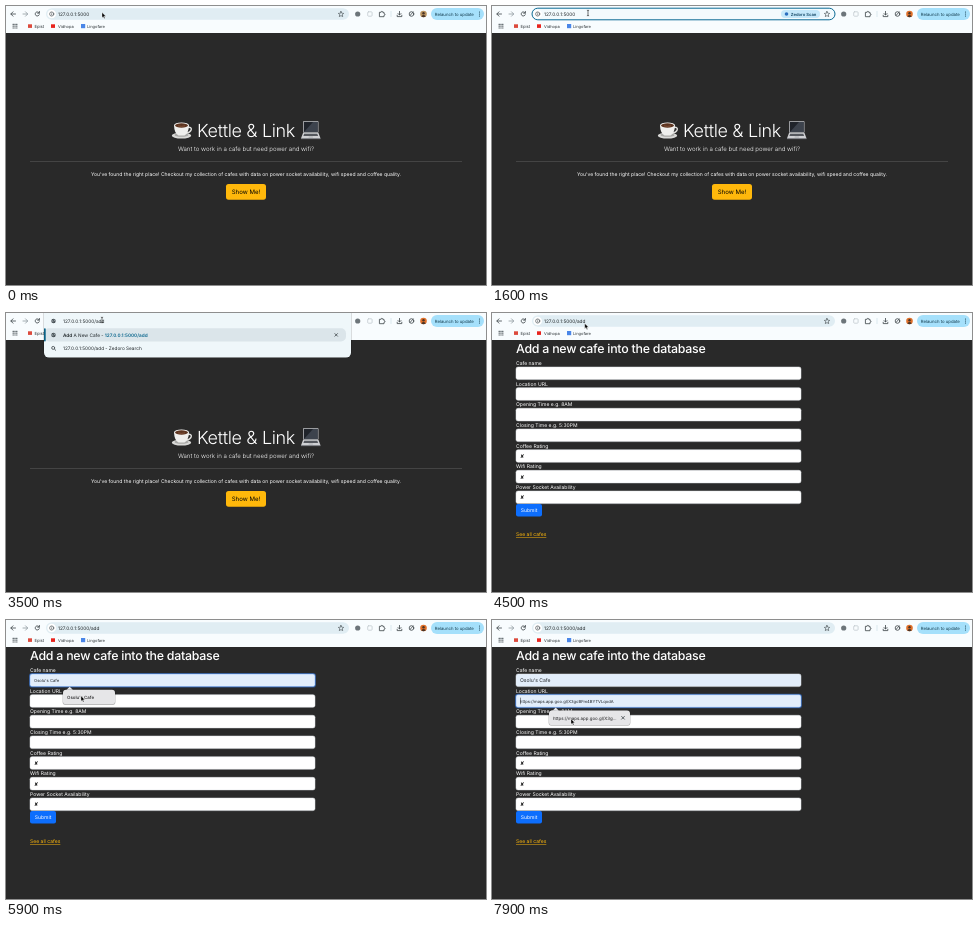
Animation, 480 px wide and 279 px high, one loop 8 s. Source, as an HTML page:

```html
<!DOCTYPE html>
<html lang="en">
<head>
<meta charset="utf-8">
<title>Cafe form</title>
<style>
  html, body { margin: 0; width: 100%; height: 100%; overflow: hidden; background: #292929; }
  svg { display: block; width: 100vw; height: 100vh; }
  text { font-family: Inter, "Open Sans", sans-serif; text-rendering: geometricPrecision; white-space: pre; }
  .icon { fill: none; stroke: #3c4347; stroke-width: .8; stroke-linecap: round; stroke-linejoin: round; }
  .pale { stroke: #c3cbd0; }
  .bold { font-weight: 600; }
  .link { fill: #08658c; }
  .mark { font-family: "DejaVu Sans", sans-serif; }
</style>
</head>
<body>
<svg id="stage" viewBox="0 0 480 279" preserveAspectRatio="none">
  <rect width="480" height="279" fill="#292929"/>

  <g id="home">
    <g id="cup">
      <ellipse cx="175.5" cy="129.6" rx="9.7" ry="3" fill="#d9d9d7"/>
      <ellipse cx="175.5" cy="129" rx="7" ry="1.7" fill="#a9a9a7"/>
      <path d="M181 121.5q5-1 4.2 2.2q-1 3-5.5 3.2" fill="none" stroke="#dededc" stroke-width="1.5"/>
      <path d="M168 119.5q.3 7.5 4.5 10h6q4.2-2.5 4.5-10z" fill="#efefed"/>
      <ellipse cx="175.5" cy="119.3" rx="7.5" ry="2.9" fill="#f6f6f4"/>
      <ellipse cx="175.5" cy="119.5" rx="6.5" ry="2.2" fill="#5c3420"/>
      <path d="M172 119.8q3.5 1.2 7 0" fill="none" stroke="#946044" stroke-width=".6"/>
    </g>
    <g id="laptop">
      <rect x="297" y="115" width="15.5" height="12" rx="1" fill="#b9babd"/>
      <rect x="297.8" y="115.8" width="13.9" height="10.4" fill="#20242b"/>
      <path d="M298 126l9-10h4.5v10z" fill="#3d434d"/>
      <path d="M297 127h15.5l2 5.2h-19.5z" fill="#cfd0d3"/>
      <path d="M298.2 127.8h13.1l.8 2.2h-14.7z" fill="#55585e"/>
      <path d="M302.8 130.5h4l.3 1.1h-4.6z" fill="#aeb0b4"/>
      <path d="M295 132.2h19.5v.9h-19.5z" fill="#8f9196"/>
    </g>
    <path d="M24 155.5H456" stroke="#585858" stroke-width=".6"/>
    <rect x="220" y="178" width="40" height="15.7" rx="2.6" fill="#ffb80b"/>
  </g>

  <g id="form"></g>

  <g id="bar">
    <rect width="480" height="27" fill="#f8fcfe"/>
    <path class="icon" d="M9.5 8H5M7 5.8L4.8 8 7 10.2"/>
    <path class="icon" style="stroke:#8d979d" d="M17 8h4.5M19.5 5.8L21.7 8l-2.2 2.2"/>
    <path class="icon" d="M33.2 7a2.1 2.1 0 1 0 .1 1.7M33.4 5.4v1.8h-1.8"/>
    <rect id="pill" x="40" y="2.2" width="303" height="11.6" rx="5.8"/>
    <g id="info">
      <circle cx="45.7" cy="8" r="4.3" fill="#fff"/>
      <circle class="icon" cx="45.7" cy="8" r="2.1" style="stroke-width:.6"/>
      <path class="icon" d="M45.7 7.9v1M45.7 6.9v.05" style="stroke-width:.6"/>
    </g>
    <g id="chip">
      <rect x="289" y="4" width="39" height="8" rx="4" fill="#c5e8fa"/>
      <circle cx="294.5" cy="8" r="1.8" fill="#2a6fc0"/>
    </g>
    <path class="icon" style="stroke-width:.6" d="M335 5.4l.8 1.8 1.9.2-1.4 1.3.4 1.9-1.7-1-1.7 1 .4-1.9-1.4-1.3 1.9-.2z"/>
    <circle cx="351.7" cy="8" r="2.6" fill="#6d757a"/>
    <rect x="361.7" y="5.8" width="4.4" height="4.4" rx=".8" class="icon pale"/>
    <path class="icon" d="M373.8 6.3h1.3q0-1 .8-1t.8 1h1.3v1.4q1 0 1 .8t-1 .8v1.4h-4.2z"/>
    <path d="M385 5v6" stroke="#c6dbe5" stroke-width=".6"/>
    <path class="icon" d="M393.5 5.4v3.5M392 7.5l1.5 1.5 1.5-1.5M391.2 9.2v1.4h4.6V9.2"/>
    <circle class="icon" cx="405.5" cy="8" r="2.3"/>
    <path class="icon" d="M404.2 9.3l3-3.4"/>
    <circle id="face" cx="417.5" cy="8" r="3.3"/>
    <path d="M415.3 10.4q2.2-2.6 4.4 0-2.2 1.6-4.4 0z" fill="#4a3426"/>
    <circle cx="417.5" cy="7.3" r="1.2" fill="#4a3426"/>
    <rect x="425" y="2" width="53" height="12" rx="6" fill="#a5e0fb"/>
    <g fill="#123a4c"><circle cx="473.5" cy="6" r=".55"/><circle cx="473.5" cy="8" r=".55"/><circle cx="473.5" cy="10" r=".55"/></g>
    <g id="grid"></g>
    <rect x="22" y="18.3" width="4" height="3.6" fill="#dc4a3d"/>
    <rect x="45" y="18.3" width="4" height="3.6" fill="#e8231d"/>
    <rect x="75" y="18" width="4.2" height="4.2" fill="#4a86e8"/>
  </g>

  <g id="drop"></g>
  <rect id="select" y="4.2" height="7.6" fill="#0b6286"/>
  <text id="url" y="9.7" font-size="4.75" fill="#1d2326"><tspan id="typed"></tspan><tspan id="rest" fill="#fff"></tspan></text>

  <g id="popup"></g>
  <path id="arrow" d="M0 0v5.2l1.2-1.1.9 2 .9-.4-.9-1.9h1.7z" fill="#000" stroke="#fff" stroke-width=".35"/>
  <path id="beam" d="M94.9 4.2q1.1 0 1.1.8v4q0 .8-1.1.8M97.1 4.2q-1.1 0-1.1.8M96 9q0 .8 1.1.8" fill="none" stroke="#111" stroke-width=".6"/>
</svg>
<script>
const LOOP = 8000, STEP = 100;
const HOST = "127.0.0.1:5000", CAFE = "Osolu's Cafe", MAP = "https://maps.app.goo.gl/X3gcBFm4BYTVLqodA";
const $ = id => document.getElementById(id);

function add(parent, tag, attrs, content = "") {
  const el = document.createElementNS("http://www.w3.org/2000/svg", tag);
  for (const k in attrs) el.setAttribute(k, attrs[k]);
  el.textContent = content;
  parent.append(el);
  return el;
}
const label = (parent, x, y, size, content, fill = "#fff", more = {}) =>
  add(parent, "text", { x, y, "font-size": size, fill, ...more }, content);
const box = (parent, x, y, width, height, rx, fill) =>
  add(parent, "rect", { x, y, width, height, rx, fill });
const show = (el, on) => { el.style.display = on ? "" : "none"; };

// Home page
const mid = { "text-anchor": "middle" };
label($("home"), 240, 131.2, 18, "Kettle & Link", "#fff", { ...mid, "font-weight": 300, "letter-spacing": "-.02em" });
label($("home"), 240, 145.2, 6.1, "Want to work in a cafe but need power and wifi?", "#fff", { ...mid, "font-weight": 300 });
label($("home"), 240, 170, 5.05, "You've found the right place! Checkout my collection of cafes with data on power socket availability, wifi speed and coffee quality.", "#fff", mid);
label($("home"), 240, 188, 6.1, "Show Me!", "#000", mid);

// Form page
const form = $("form"), ROW = 20.67;
label(form, 24, 40.3, 12.4, "Add a new cafe into the database", "#fff", { "font-weight": 500, "letter-spacing": "-.02em" });
const fields = ["Cafe name", "Location URL", "Opening Time e.g. 8AM", "Closing Time e.g. 5:30PM",
  "Coffee Rating", "Wifi Rating", "Power Socket Availability"].map((name, i) => {
  const y = 54 + ROW * i;
  label(form, 24, y - 2.1, 5.05, name);
  const glow = box(form, 23, y - 1, 287, 14.6, 2.8, "#2b4f86");
  const body = box(form, 24, y, 285, 12.6, 2, "#fff");
  const value = label(form, 28, y + 8.2, 5.05, "", "#212529");
  if (i > 3) label(form, 28, y + 8.2, 5.2, "✘", "#111", { class: "mark" });
  const caret = box(form, 28, y + 3, .5, 6.6, 0, "#222");
  body.setAttribute("stroke-width", .5);
  return { glow, body, value, caret };
});
box(form, 24, 191, 26, 12.6, 2, "#0d6efd");
label(form, 37, 199.2, 5.05, "Submit", "#fff", mid);
label(form, 24, 223, 5.05, "See all cafes", "#ffb80b", { "text-decoration": "underline" });

// Browser bar
const bar = $("bar"), ink = "#2a3135";
for (let i = 0; i < 9; i++)
  box($("grid"), 6.6 + (i % 3) * 1.8, 17.8 + Math.floor(i / 3) * 1.8, 1.2, 1.2, .2, "#4a5358");
label(bar, 28.5, 21.7, 4.2, "Epist", ink);
label(bar, 52, 21.7, 4, "Vidhopa", ink);
label(bar, 81, 21.7, 4, "Lingofare", ink);
label(bar, 428.7, 9.6, 4.3, "Relaunch to update", "#123a4c");
label($("chip"), 298.7, 9.5, 4.2, "Zedoro Scan", "#0d4260", { class: "bold" });

// Address suggestions: each part is [text, class]
function suggestions(typed) {
  const path = "/add".slice(typed.length), done = typed === "/add";
  const rows = [
    [[done ? "Add" : "Add A", "bold"], [done ? " A New Cafe - " : " New Cafe - "], [HOST + typed, "bold link"], [path, "link"]],
    [[HOST + typed + " - Zedoro Search"]]
  ];
  if (typed.length < 3) rows.push(
    [[HOST + "/O", "bold"], ["solu - "], [HOST + "/O", "bold link"], ["solu", "link"]],
    [["Clean Blog - Start Bootstrap Theme - "], [HOST + "/a", "bold link"], ["bout", "link"]]);
  return rows;
}
function globe(parent, y) {
  add(parent, "circle", { cx: 47.5, cy: y, r: 2.2, fill: "#3f474c" });
  add(parent, "path", { d: `M45.9 ${y - .6}q1.4 .2 1.2 1.9M48 ${y - 1.6}q-.4 1.4 1.2 1.7`, fill: "none", stroke: "#dbe7ed", "stroke-width": .6 });
}
function drawDrop(typed) {
  const g = $("drop"), rows = suggestions(typed);
  g.replaceChildren();
  const h = 18 + 13.3 * rows.length;
  box(g, 37.5, -6, 308, h + 6.5, 5.5, "#00000040");
  box(g, 38, -6, 307, h + 6, 5, "#eff7fa");
  box(g, 38, 15.3, 302, 13.2, 5, "#dbe5ea");
  box(g, 38, 15.3, 1.7, 13.2, .8, "#0b6286");
  globe(g, 8);
  rows.forEach((parts, i) => {
    const y = 22 + 13.3 * i;
    if (i === 1) add(g, "path", { class: "icon", d: `M48.4 ${y + .7}l1.3 1.3M48.7 ${y - .4}a1.5 1.5 0 1 0-3 0 1.5 1.5 0 0 0 3 0` });
    else globe(g, y);
    const line = label(g, 57, y + 1.7, 4.72, "", "#1d2326");
    for (const [s, cls = ""] of parts) add(line, "tspan", { class: cls }, s);
  });
  add(g, "path", { class: "icon", d: "M328.9 20.6l2.6 2.6M331.5 20.6l-2.6 2.6" });
}

function drawPopup(top, width, text, hover, bold) {
  const g = $("popup");
  g.replaceChildren();
  const fill = hover ? "#e6e6e8" : "#f7f8fa";
  box(g, 56.6, top - .2, width + .8, 15.4, 3.2, "#00000050");
  box(g, 57, top, width, 14.6, 3, fill);
  add(g, "path", { d: `M60.5 ${top + .1}l3.2-3.1 3.2 3.1z`, fill });
  label(g, 61, top + 9, 4.43, text, "#1c1c1e", bold ? { "font-weight": 500 } : {});
  if (bold) return;
  add(g, "path", { class: "icon", d: `M129.6 ${top + 5.8}l2.8 2.8M132.4 ${top + 5.8}l-2.8 2.8` });
}

// Time tables
const TYPING = [[0, "", ""], [2100, "/", ""], [2400, "/a", "dd"], [2800, "/ad", "d"], [3100, "/add", ""]];
const POINTER = [[0, 96, 6.5], [4400, 96, 6.5], [5000, 52, 59.5], [5400, 52, 59.5], [5900, 75, 76],
  [6200, 75, 76], [6600, 68, 80.3], [7200, 68, 80.3], [7700, 79, 99], [LOOP, 79, 99]];
const FOCUS = 500, OPEN = 2100, ENTER = 3600, LOAD = 3700, CLICK = [5000, 6900], PICK = 6100;

const last = (table, t) => table.filter(row => row[0] <= t).pop();
function pointer(t) {
  const i = Math.max(1, POINTER.findIndex(p => p[0] > t));
  const [a, b] = [POINTER[i - 1], POINTER[i]];
  const u = (t - a[0]) / (b[0] - a[0]), k = u * u * (3 - 2 * u);
  return [a[1] + (b[1] - a[1]) * k, a[2] + (b[2] - a[2]) * k];
}

function setField(i, t, active, value, preview) {
  const f = fields[i];
  show(f.glow, active);
  f.body.setAttribute("fill", value ? "#e3eefb" : "#fff");
  f.body.setAttribute("stroke", active ? "#78aefc" : "#dee2e6");
  f.value.textContent = value;
  f.value.setAttribute("font-size", preview ? 4.15 : 5.05);
  show(f.caret, active && (t - CLICK[i]) % 1000 < 500);
}

function render(t) {
  const home = t < LOAD, open = t >= OPEN && t < ENTER, focus = t >= FOCUS && t < ENTER;
  show($("home"), home);
  show(form, !home);

  const [, typed, rest] = last(TYPING, t);
  const left = open ? 57 : 52;
  $("pill").setAttribute("fill", focus ? "#f3fafd" : "#e0edf3");
  $("pill").setAttribute("stroke", focus ? "#0b6a94" : "none");
  $("face").setAttribute("fill", t < FOCUS ? "#b9935f" : "#e0702a");
  show($("chip"), focus);
  show($("drop"), open);
  if (open) drawDrop(typed);
  $("url").setAttribute("x", left);
  $("typed").textContent = HOST + typed;
  $("rest").textContent = rest;
  show($("select"), rest);
  if (rest) {
    $("select").setAttribute("x", left + $("typed").getComputedTextLength());
    $("select").setAttribute("width", $("rest").getComputedTextLength());
  }

  const hoverName = t >= 5800 && t < PICK, hoverMap = t >= 7600;
  const second = t >= CLICK[1];
  setField(0, t, t >= CLICK[0] && !second, t >= 5800 ? CAFE : "", hoverName);
  setField(1, t, second, hoverMap ? MAP : "", hoverMap);
  for (let i = 2; i < fields.length; i++) setField(i, t, false, "", false);

  const popName = t >= CLICK[0] + 100 && t < PICK, popMap = t >= CLICK[1] + 200;
  show($("popup"), popName || popMap);
  if (popName) drawPopup(69.7, 52, CAFE, hoverName, true);
  if (popMap) drawPopup(90.6, 81, "https://maps.app.goo.gl/X3g...", hoverMap, false);

  const [x, y] = pointer(t), beam = t >= FOCUS && t < 4400;
  const hidden = t >= 2000 && t < 3400;
  show($("beam"), beam && !hidden);
  show($("arrow"), !beam);
  $("arrow").setAttribute("transform", `matrix(1 0 0 1 ${x} ${y})`);
}

const start = performance.now();
let shown = -1;
function tick() {
  const t = Math.floor(((performance.now() - start) % LOOP) / STEP) * STEP;
  if (t !== shown) render(shown = t);
  requestAnimationFrame(tick);
}
tick();
</script>
</body>
</html>
```
